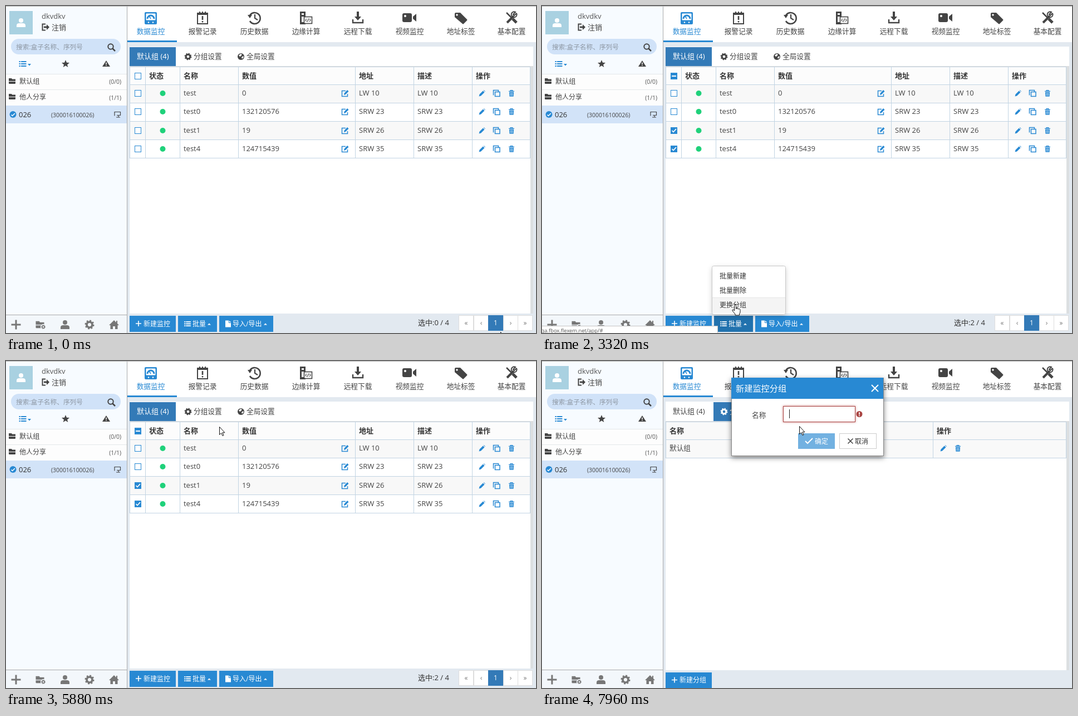
Recreate the animation shown at these times as an HTML page. Size 952 by 588 pixels, loop 8000 ms.

```html
<!DOCTYPE html>
<html lang="zh">
<head>
<meta charset="utf-8">
<title>监控分组</title>
<style>
html, body { margin: 0; width: 100%; height: 100%; overflow: hidden; background: #e2e9f0; }
svg { display: block; }
text { font-family: 'Open Sans', 'Noto Sans CJK SC', 'Noto Sans CJK', sans-serif; white-space: pre; }
</style>
</head>
<body>
<svg id="stage" width="952" height="588" viewBox="0 0 952 588"></svg>
<script>
const BLUE = '#2889d3', TAB = '#337ab7', DARK = '#444', LINE = '#c2d4e3', HOVER = '#2272ae';
const LOOP = 8000;

// Drawing helpers
const rect = (x, y, w, h, fill, more = '') =>
  `<rect x="${x}" y="${y}" width="${w}" height="${h}" fill="${fill}" ${more}/>`;
const frame = (x, y, w, h, stroke, fill = '#fff', more = '') =>
  rect(x + .5, y + .5, w - 1, h - 1, fill, `stroke="${stroke}" ${more}`);
const text = (x, y, s, fill = '#444', size = 13, more = '') =>
  `<text x="${x}" y="${y}" fill="${fill}" font-size="${size}" ${more}>${s}</text>`;
const bold = (x, y, s) => text(x, y, s, '#333', 13, 'font-weight="700"');
const fillPath = (d, c = DARK) => `<path d="${d}" fill="${c}"/>`;
const line = (d, c = DARK, w = 1) => `<path d="${d}" fill="none" stroke="${c}" stroke-width="${w}"/>`;
const circle = (x, y, r, fill, more = '') => `<circle cx="${x}" cy="${y}" r="${r}" fill="${fill}" ${more}/>`;
const at = (x, y, s, k = 1) => `<g transform="translate(${x} ${y}) scale(${k})">${s}</g>`;
const group = (id, s) => `<g id="${id}">${s}</g>`;

// Icons, centred on 0,0
const gear = c => circle(0, 0, 4, 'none', `stroke="${c}" stroke-width="3"`) +
  circle(0, 0, 5.8, 'none', `stroke="${c}" stroke-width="2" stroke-dasharray="2.28"`);
const person = c => circle(0, -4, 4, c) + fillPath('M-8 8V5Q-8 1 -3 1H3Q8 1 8 5V8Z', c);
const plus = (c, r, w) => line(`M${-r} 0H${r}M0 ${-r}V${r}`, c, w);
const cross = (c, r, w) => line(`M${-r} ${-r}L${r} ${r}M${r} ${-r}L${-r} ${r}`, c, w);
const tick = (c, w) => line('M-6 0L-2 4L7 -5', c, w);
const folder = c => fillPath('M-6 -5H-1L0 -3.5H6V0H-6ZM-6 1H6V4Q6 5 5 5H-5Q-6 5 -6 4Z', c);
const bullets = c => line('M-6.5 -4H-4M-6.5 0H-4M-6.5 4H-4M-3 -4H6.5M-3 0H6.5M-3 4H6.5', c, 2);
const up = fillPath('M-3 1.5L0 -1.5L3 1.5Z', '#fff');
const globe = circle(0, 0, 6, DARK) + fillPath('M-4 -2L-1 -5L2 -4L0 -1L-2 0ZM1 1L4 -1L5 1L2 4Z', '#fff');
const pencil = fillPath('M-6 6L-5 2L2 -5L5 -2L-2 5ZM3 -6L4 -6.5L6.5 -4L6 -3Z', BLUE);
const copy = line('M-5.5 3.5V-5.5H3.5V-3M-2.5 -2.5H6V5.5H-2.5Z', BLUE, 1.5);
const trash = line('M-5.5 -4H5.5M-2 -4V-6H2V-4', BLUE, 1.5) + fillPath('M-4.5 -2.5H4.5L4 6.5H-4Z', BLUE) +
  line('M-2 -1V5M0 -1V5M2 -1V5', '#fff', .7);
const edit = line('M1 -4.5H-5.5V5.5H4.5V1', BLUE, 1.5) + fillPath('M-2 3L-1.5 0L4 -6L6.5 -3.5L1 2Z', BLUE);
const home = fillPath('M-9 1L0 -8L4 -4V-7H6V-2L9 1H6.5V8H2V3H-2V8H-6.5V1Z', '#777');

const navIcons = [
  rect(-11, -10, 22, 22, BLUE, 'rx="2"') + rect(-8.5, -7.5, 17, 12, '#fff', 'rx="1"') +
    line('M-6 2A6 6 0 0 1 6 2', BLUE, 3) + line('M0 2L-3 -3', BLUE, 1.5) +
    circle(-4, 8.5, 1.2, '#fff') + circle(4, 8.5, 1.2, '#fff'),
  rect(-9, -8, 18, 19, 'none', `stroke="${DARK}" stroke-width="2"`) +
    line('M-5 -11V-5M0 -11V-5M5 -11V-5M-9 -6H9', DARK, 2) + line('M0 -3V4M0 6V8.5', DARK, 2.6),
  line('M-8 -4A10 10 0 1 1 -8 6', DARK, 2.6) + fillPath('M-12 -5H-4L-8 1Z') + line('M1 -6V1L6 4', DARK, 2.2),
  rect(-11, -11, 10, 23, DARK) + rect(-8, -8, 4, 3, '#fff') + rect(-8, -2, 4, 10, '#fff') +
    frame(-4, -2, 15, 13, DARK, '#fff', 'stroke-width="1.6"') +
    line('M1 2L-1 4.5L1 7M6 2L8 4.5L6 7M4.5 1.5L2.5 7.5', DARK, 1.2),
  line('M-9 3V9H9V3', DARK, 2.4) + fillPath('M-2 -11H2V-2H6L0 5L-6 -2H-2Z'),
  rect(-13, -8, 17, 16, DARK, 'rx="3"') + fillPath('M6 -2L12 -7V7L6 2Z') + circle(-8, -3, 2, '#fff'),
  fillPath('M-11 -7Q-11 -9 -9 -9H-1L11 3Q12 4 11 5L5 11Q4 12 3 11L-11 -1Z') + circle(-7, -5, 1.7, '#fff'),
  line('M-8 9L4 -3', DARK, 4) + line('M9 -8L5 -4L3 -6L7 -10A5 5 0 1 0 9 -8', DARK, 2) +
    line('M-9 -9L0 0', DARK, 2.5) + line('M2 2L9 9', DARK, 5)
];

const box = (y, on) => on
  ? rect(231, y - 6, 12, 12, BLUE, 'rx="1"') + line(`M233.5 ${y}L236 ${y + 2.5}L241 ${y - 3}`, '#fff', 1.7)
  : frame(231, y - 6, 12, 12, BLUE);

function sidebar() {
  const icons = '#777';
  return rect(0, 0, 217, 588, '#f7fbff') + rect(6, 9, 42, 42, '#a9d1e1') + at(27, 30, person('#fff')) +
    text(64, 23, 'dkvdkv', '#555') +
    at(71, 38, line('M0 -5.5H-5.5V5.5H0', DARK, 2) + fillPath('M-3 -1.5H2V-5L7 0L2 5V1.5H-3Z')) +
    text(82, 43, '注销') +
    rect(9, 59, 197, 28, '#d0e2f8', 'rx="14"') + text(18, 78, '搜索:盒子名称、序列号', '#8d97a3', 11.7) +
    circle(188, 73, 4.7, 'none', `stroke="${DARK}" stroke-width="2"`) + line('M191.5 76.5L196 81', DARK, 2.5) +
    at(30, 104, bullets(BLUE)) + fillPath('M39 104H45L42 107.5Z', BLUE) +
    at(107, 104, fillPath('M0 -7L2 -2.2L7 -2L3 1.5L4.3 6L0 3.3L-4.3 6L-3 1.5L-7 -2L-2 -2.2Z')) +
    fillPath('M180 98L187 109H173Z') + line('M180 101.5V105M180 106V107.5', '#fff', 1.5) +
    rect(0, 122, 217, 57, '#fdfdfd') + rect(0, 122, 217, 1, '#e3e7ea') + rect(0, 150, 217, 1, '#e3e7ea') +
    at(11, 135, folder(DARK)) + text(24, 140, '默认组', '#444', 12.2) + text(207, 140, '(0/0)', '#555', 10.4, 'text-anchor="end"') +
    at(11, 163, folder(DARK)) + text(24, 168, '他人分享', '#444', 12) + text(207, 169, '(1/1)', '#555', 10.4, 'text-anchor="end"') +
    rect(0, 179, 217, 32, '#d2e3f8') + circle(12.5, 195, 6, BLUE) + at(12.5, 195.5, tick('#fff', 3), .5) +
    text(23, 200, '026', '#333') + text(81, 200, '(300016100026)', '#444', 10.4) +
    line('M195 197.5V190.5H205.5V196.5H199M198 200H205M202 197V200', DARK, 1.2) +
    rect(0, 555, 217, 33, '#f3f7fb') + rect(0, 555, 217, 1, '#aaa') +
    at(18, 573, plus(icons, 8.5, 3)) + at(61, 573, folder(icons), 1.25) +
    at(67, 577, circle(0, 0, 5, '#f3f7fb') + at(0, 0, gear(icons), .55)) +
    at(106, 573, person(icons)) + at(150, 573, gear(icons), 1.25) + at(194, 573, home) +
    rect(217, 0, 1, 588, '#aaa');
}

function nav() {
  const labels = ['数据监控', '报警记录', '历史数据', '边缘计算', '远程下载', '视频监控', '地址标签', '基本配置'];
  const xs = [260, 353, 446, 539, 632, 725, 817, 908];
  return rect(218, 0, 734, 65, '#fff') + rect(218, 62, 89, 3, BLUE) +
    labels.map((s, i) => at(xs[i], 21, navIcons[i]) +
      text(xs[i], 50, s, i ? DARK : BLUE, 12.7, 'text-anchor="middle"')).join('');
}

function tabs(active) {
  const c = i => i === active ? '#fff' : DARK;
  return (active ? rect(308, 74, 92, 34, TAB) : rect(222, 74, 83, 34, TAB)) +
    text(235, 95, '默认组 (4)', c(0)) + at(327, 91, gear(c(1)), .95) + text(337, 95, '分组设置', c(1), 12.7) +
    at(422, 91, globe) + text(432, 95, '全局设置', DARK, 12.7);
}

const grid = (xs, ys) => line(xs.map(x => `M${x + .5} ${ys[0]}V${ys[ys.length - 1]}`).join('') +
  ys.map(y => `M222 ${y + .5}H942`).join(''), LINE);
const panel = h => rect(222, 73, 725, 35, '#fff') + rect(222, 108, 725, 1, '#ddd') +
  rect(222, 109, 720, h, '#fff') + rect(942, 109, 5, h, '#dcdfe1');

function monitorView() {
  const rows = [['test', '0', 'LW 10'], ['test0', '132120576', 'SRW 23'], ['test1', '19', 'SRW 26'], ['test4', '124715439', 'SRW 35']];
  const cols = [222, 250, 312, 417, 627, 732, 837, 941];
  let s = panel(444) + rect(222, 109, 720, 32, '#fcfcfc') +
    rect(222, 141, 720, 33, '#f8f8f8') + rect(222, 207, 720, 33, '#f8f8f8') + grid(cols, [109, 141, 174, 207, 240, 273]);
  ['状态', '名称', '数值', '地址', '描述', '操作'].forEach((h, i) => s += bold(cols[i + 1] + 7, 130, h));
  s += box(126) + group('someOn', rect(231, 120, 12, 12, BLUE, 'rx="1"') + rect(233, 125, 8, 2, '#fff'));
  rows.forEach(([name, value, addr], i) => {
    const y = 157 + Math.round(i * 33.3);
    s += box(y) + (i > 1 ? group('on' + i, box(y, true)) : '') + circle(281.5, y, 5, '#1fd17a') +
      text(319, y + 4, name) + text(424, y + 4, value) + text(634, y + 4, addr) + text(739, y + 4, addr) +
      at(609, y, edit) + at(855, y, pencil, .9) + at(881, y, copy) + at(908, y, trash, .9);
  });
  s += rect(222, 557, 83, 29, BLUE) + rect(309, 557, 70, 29, BLUE, 'id="batch"') + rect(383, 557, 97, 29, BLUE) +
    at(238, 571, plus('#fff', 5, 1.6)) + text(247, 576, '新建监控', '#fff', 12) +
    at(326, 571.5, bullets('#fff'), .9) + text(335, 576, '批量', '#fff', 12) + at(365, 572, up) +
    fillPath('M394 565.5H400V570H404V577.5H394ZM401 565.5L404 569H401Z', '#fff') +
    text(407, 576, '导入/导出', '#fff', 12) + at(466, 572, up) +
    `<text id="count" x="740" y="574" font-size="13" fill="#333"></text>`;
  ['«', '‹', '1', '›', '»'].forEach((p, i) => {
    const x = 813 + Math.round(i * 26.6), on = i === 2;
    s += frame(x, 556, 27, 28, on ? TAB : '#ddd', on ? TAB : '#fff') +
      text(x + 13.5, 574, p, on ? '#fff' : '#777', 12, 'text-anchor="middle"');
  });
  return s + tabs(0) + group('tabHover', rect(308, 74, 92, 34, '#eee') +
    at(327, 91, gear(DARK), .95) + text(337, 95, '分组设置', DARK, 12.7));
}

function groupView() {
  return panel(447) + rect(222, 109, 720, 65, '#f9f9f9') + grid([222, 702, 941], [109, 141, 174]) +
    bold(229, 130, '名称') + bold(709, 130, '操作') + text(229, 161, '默认组', '#444', 12.7) +
    at(721, 157, pencil, .9) + at(747, 157, trash, .9) +
    rect(222, 560, 83, 28, BLUE, 'id="newGroup"') + at(238, 573.5, plus('#fff', 5, 1.6)) +
    text(247, 578, '新建分组', '#fff', 12) + tabs(1);
}

function dialog(title, h, body, okFill) {
  const y = h - 11;
  return `<g style="filter:drop-shadow(0 3px 5px rgba(0,0,0,.5))">${frame(340, 30, 274, h, '#888')}</g>` +
    rect(340, 30, 273, 38, BLUE) + text(348, 55, title, '#fff', 15.2) + at(598, 49, cross('#fff', 6, 2)) + body +
    rect(460, y, 66, 28, okFill) + at(479, y + 14, tick('#fff', 2)) + text(490, y + 18.5, '确定', '#fff', 12) +
    frame(534, y, 67, 28, '#ccc', '#fff', okFill === BLUE ? 'id="cancel"' : '') +
    at(554, y + 14, cross('#333', 4.5, 1.4)) + text(562, y + 18.5, '取消', '#333', 12);
}

const pickBody = frame(365, 82, 223, 28, '#ccc') + text(375, 100, '请填写分组名称,支持模糊过滤', '#999', 11.7) +
  frame(365, 114, 223, 166, '#ccd5dc') + rect(583, 115, 4, 165, '#dcdcdc') +
  line('M365 146.5H583M582.5 114V146', LINE) + bold(372, 134.5, '组名');
const nameBody = text(377, 102, '名称', '#444', 12.7) +
  `<g style="filter:drop-shadow(0 0 2px #ce8483)">${frame(433, 81, 130, 29, '#a94442')}</g>` +
  rect(444, 87, 1, 16, '#222') + circle(570, 95.5, 5.5, '#a94442') + line('M570 92V96.5M570 97.5V99.3', '#fff', 1.7);

const menu = `<g style="filter:drop-shadow(0 3px 4px rgba(0,0,0,.18))">${frame(305, 467, 133, 88, '#c8c8c8', '#fff', 'rx="3"')}</g>` +
  group('itemHover', rect(306, 524, 131, 28, '#f4f4f4') + rect(306, 524, 131, 1, '#e5e5e5')) +
  ['批量新建', '批量删除', '更换分组'].map((s, i) => text(319, 490 + i * 26.2, s, '#333', 12)).join('');

const status = frame(-1, 575, 317, 14, '#c4c4c4', '#fff') +
  `<text id="link" x="-1.5" y="587" font-size="9.4" fill="#555"></text>`;
const ink = 'fill="#fff" stroke="#111" stroke-width="1" stroke-linejoin="round"';
const pointer = group('arrow', `<path d="M.5 .5V14.5L3.7 11.6L6 16.5L8 15.6L5.8 10.8H10Z" ${ink}/>`) +
  group('hand', `<path d="M-1.5 11V1.8A1.5 1.5 0 0 1 1.5 1.8V8C1.5 6 4 6 4 8C4 6.5 6.5 6.5 6.5 8.5C6.5 7 9 7 9 9.5V13Q9 15 7.5 17V19H0V17L-5 11Q-5.5 8.5 -3.2 9Z" ${ink}/>`);

const $ = id => document.getElementById(id);
$('stage').innerHTML = rect(218, 65, 734, 523, '#e2e9f0') + nav() +
  group('monitor', monitorView()) + group('groups', groupView()) + sidebar() + rect(0, 0, 952, 1, '#b5b5b5') +
  group('menu', menu) + group('pick', dialog('请选择分组', 304, pickBody, BLUE)) +
  group('create', dialog('新建监控分组', 141, nameBody, '#72b1e1')) + group('status', status) + group('pointer', pointer);

// Screen refreshes: start, end, count
const bursts = [[70, 840, 11], [1070, 1230, 3], [1380, 1460, 2], [1760, 2010, 4], [2085, 2540, 7], [2620, 2700, 2],
  [2850, 3080, 4], [3250, 3320, 2], [3630, 3630, 1], [3780, 4020, 4], [4095, 4410, 5], [4710, 5250, 8], [5500, 5500, 1],
  [5720, 5880, 3], [5970, 6050, 2], [6200, 6660, 7], [6740, 6970, 4], [7040, 7500, 7], [7660, 7960, 5]];
// Pointer: time, x, y
const path = [[0, 888, 586], [840, 235, 221], [1070, 235, 221], [1230, 230, 259], [1300, 230, 259], [1460, 235, 263],
  [1760, 235, 263], [2010, 343, 491], [2540, 346, 566], [2700, 347, 569], [2850, 347, 569], [3080, 347, 541],
  [3320, 347, 537], [3700, 347, 537], [4020, 460, 227], [4410, 468, 161], [4630, 468, 161], [5170, 557, 296],
  [5250, 557, 294], [5420, 557, 294], [5500, 551, 294], [5640, 551, 294], [5880, 383, 118], [6050, 356, 89],
  [6280, 356, 89], [6660, 495, 293], [6970, 431, 352], [7500, 262, 566], [7660, 262, 566], [7960, 462, 117], [LOOP, 462, 117]];

function lastRefresh(t) {
  let h = 0;
  for (const [a, b, n] of bursts) {
    if (t < a) break;
    const k = n > 1 ? Math.min(n - 1, Math.floor((t - a) / (b - a) * (n - 1) + 1e-6)) : 0;
    h = n > 1 ? a + (b - a) * k / (n - 1) : a;
  }
  return h;
}

function pointerAt(t) {
  const i = path.findIndex(k => k[0] > t);
  const [a, x, y] = path[i - 1], [b, u, v] = path[i];
  const p = (t - a) / (b - a), e = p * p * (3 - 2 * p);
  return [Math.round(x + (u - x) * e), Math.round(y + (v - y) * e)];
}

const clamp = v => Math.max(0, Math.min(1, v));
const show = (id, on) => { $(id).style.display = on ? '' : 'none'; };

function render(t) {
  const h = lastRefresh(t);
  const within = (a, b) => h >= a && h < b;
  show('monitor', h < 6200);
  show('groups', h >= 6200);
  show('someOn', h >= 1070);
  show('on2', h >= 1070);
  show('on3', h >= 1760);
  $('count').textContent = `选中:${(h >= 1070) + (h >= 1760)} / 4`;
  show('menu', within(2850, 3630));
  show('itemHover', within(3070, 3630));
  show('pick', within(3630, 5250));
  show('create', h >= 7660);
  show('tabHover', within(5960, 6200));
  $('batch').setAttribute('fill', within(2530, 3630) ? HOVER : BLUE);
  $('newGroup').setAttribute('fill', within(7420, 7700) ? HOVER : BLUE);
  $('cancel').setAttribute('fill', within(5000, 5250) ? '#e6e6e6' : '#fff');

  const first = clamp((h - 3180) / 140) * clamp((4160 - h) / 300);
  const second = clamp((h - 6120) / 150) * clamp((6970 - h) / 300);
  $('status').style.opacity = h < 5000 ? first : second;
  $('link').textContent = 'qa.fbox.flexem.net/app/' + (h < 5000 ? '#' : '');

  const hand = within(2460, 3630) || within(5000, 5500) || within(5960, 6330) || within(7420, 7700);
  show('hand', hand);
  show('arrow', !hand);
  $('pointer').setAttribute('transform', `translate(${pointerAt(h)})`);
}

const start = performance.now();
function tick_() {
  render((performance.now() - start) % LOOP);
  requestAnimationFrame(tick_);
}
tick_();
</script>
</body>
</html>
```
